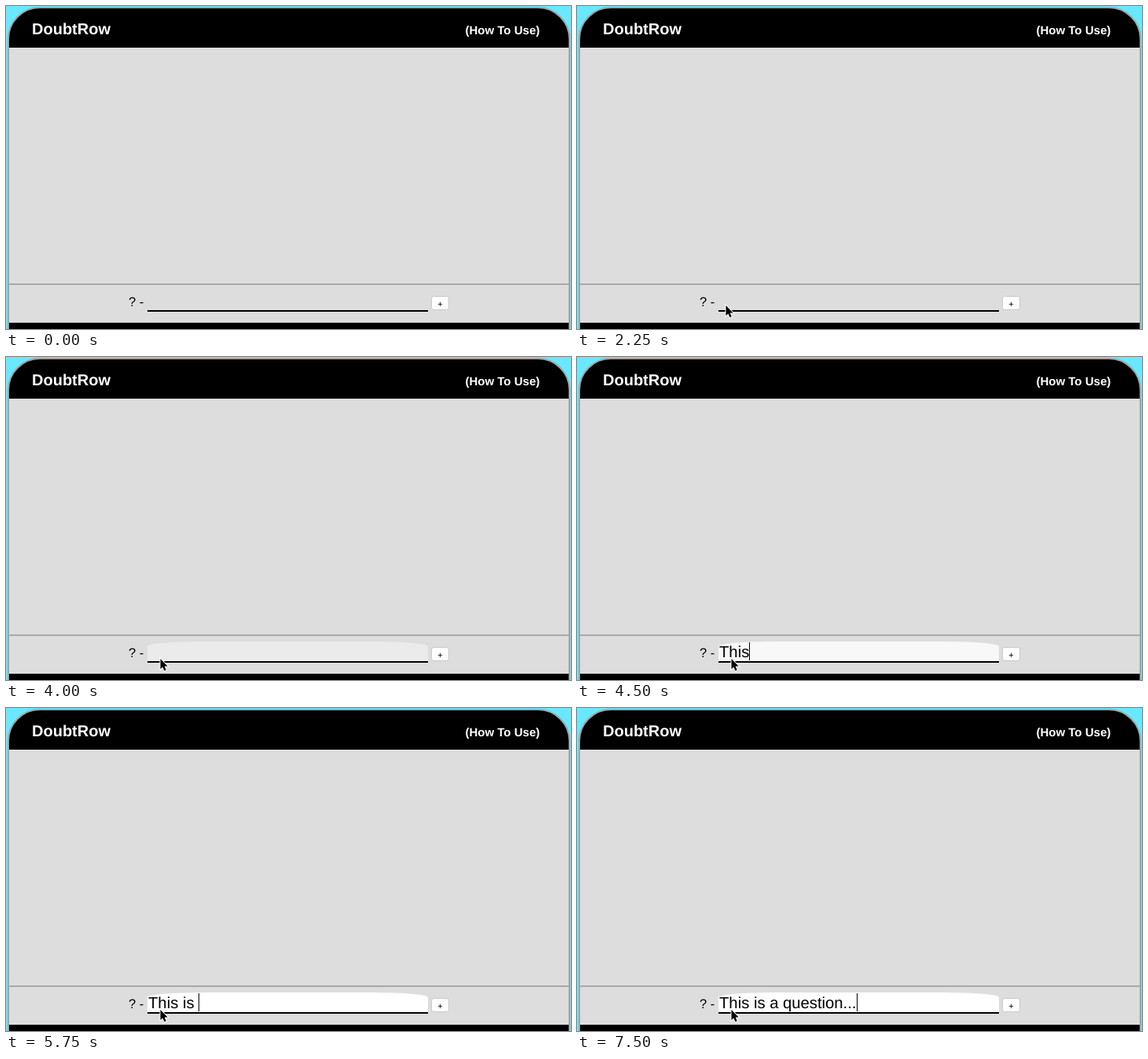
Recreate the animation shown at these times as an HTML page. Size 719 by 411 pixels, loop 8 s.

```html
<!DOCTYPE html>
<html lang="en">
<head>
<meta charset="utf-8">
<title>Question list</title>
<style>
  html, body { margin: 0; width: 100%; height: 100%; overflow: hidden; background: #69e8ff; }
  svg { display: block; width: 719px; height: 411px; }
  text { font-family: "Liberation Sans", Arial, Helvetica, sans-serif; white-space: pre; text-rendering: geometricPrecision; }
  .head { font-weight: bold; fill: #fff; }
</style>
</head>
<body>
<svg viewBox="0 0 719 411">
  <defs>
    <path id="panel" d="M3 420V42A40 40 0 0 1 43 2H677A40 40 0 0 1 717 42V420Z"/>
    <clipPath id="inside"><use href="#panel"/></clipPath>
  </defs>
  <rect width="719" height="411" fill="#69e8ff"/>
  <g clip-path="url(#inside)">
    <rect width="719" height="411" fill="#ddd"/>
    <rect width="719" height="53" fill="#000"/>
    <rect y="353" width="719" height="2" fill="#a9a9a9"/>
    <rect y="403" width="719" height="8" fill="#000"/>
  </g>
  <use href="#panel" fill="none" stroke="#a3a3a3" stroke-width="2"/>

  <text class="head" x="33" y="36" font-size="20">DoubtRow</text>
  <text class="head" x="584.5" y="36" font-size="15">(How To Use)</text>

  <text x="156" y="382" font-size="16.5">? -</text>
  <path id="field" d="M180 388V368A71 6 0 0 1 251 362H466A71 6 0 0 1 537 368V388Z"/>
  <rect x="180" y="387" width="357" height="2"/>
  <text id="typed" x="181" y="382" font-size="20.25"></text>
  <rect id="caret" y="363" width="1" height="23"/>

  <rect x="541.5" y="369.5" width="22" height="17" rx="3" fill="#fff" stroke="#c8c8c8"/>
  <text x="552.5" y="382.5" font-size="11" text-anchor="middle">+</text>

  <path id="pointer" d="M1.5 2V15L4.4 12.4L6.5 17.2L8.7 16.2L6.7 11.6H10.7Z"
        stroke="#fff" stroke-width="2" paint-order="stroke"/>
</svg>
<script>
const LOOP = 8000, STEP = 250;

// [time, x, y]
const moves = [
  [1500, 163, 374], [1750, 181, 357], [2000, 188, 376],
  [2250, 188, 379], [3000, 193, 379], [3250, 195, 382]
];

// [time, text, caret x]
const typing = [
  [3500, "", 181], [4000, "", null],
  [4250, "Th", 204], [4500, "This", 219], [4750, "Thisi", 223],
  [5000, "Thisis", 233], [5250, "This", 219], [5500, "This i", 229],
  [5750, "This is ", 245], [6000, "This is a", 256], [6250, "This is a q", 273],
  [6500, "This is a ques", 306], [6750, "This is a questi", 317],
  [7000, "This is a question", 339], [7250, "This is a question.", 345],
  [7500, "This is a question...", 356]
];

const [field, typed, caret, pointer] =
  ["field", "typed", "caret", "pointer"].map(id => document.getElementById(id));

const latest = (list, t) => list.filter(step => step[0] <= t).pop();
const show = (el, on) => el.setAttribute("visibility", on ? "visible" : "hidden");

// CSS "ease" curve, solved by bisection
function ease(p) {
  const bez = (a, b, u) => 3 * a * u * (1 - u) ** 2 + 3 * b * u * u * (1 - u) + u ** 3;
  let lo = 0, hi = 1;
  for (let i = 0; i < 24; i++) {
    const mid = (lo + hi) / 2;
    if (bez(0.25, 0.25, mid) < p) lo = mid; else hi = mid;
  }
  return bez(0.1, 1, lo);
}

function draw(time) {
  const t = Math.floor(time % LOOP / STEP) * STEP;

  const move = latest(moves, t);
  show(pointer, move);
  if (move) pointer.setAttribute("transform", `translate(${move[1]} ${move[2]})`);

  const [, text, x] = latest(typing, t) || [0, "", null];
  typed.textContent = text;
  show(caret, x !== null);
  if (x !== null) caret.setAttribute("x", x);

  const glow = t < 4000 ? 0 : ease(Math.min(1, (t - 3500) / 2000));
  const level = Math.round(221 + 34 * glow);
  field.setAttribute("fill", `rgb(${level},${level},${level})`);
}

function tick() {
  draw(performance.now());
  requestAnimationFrame(tick);
}
tick();
</script>
</body>
</html>
```
